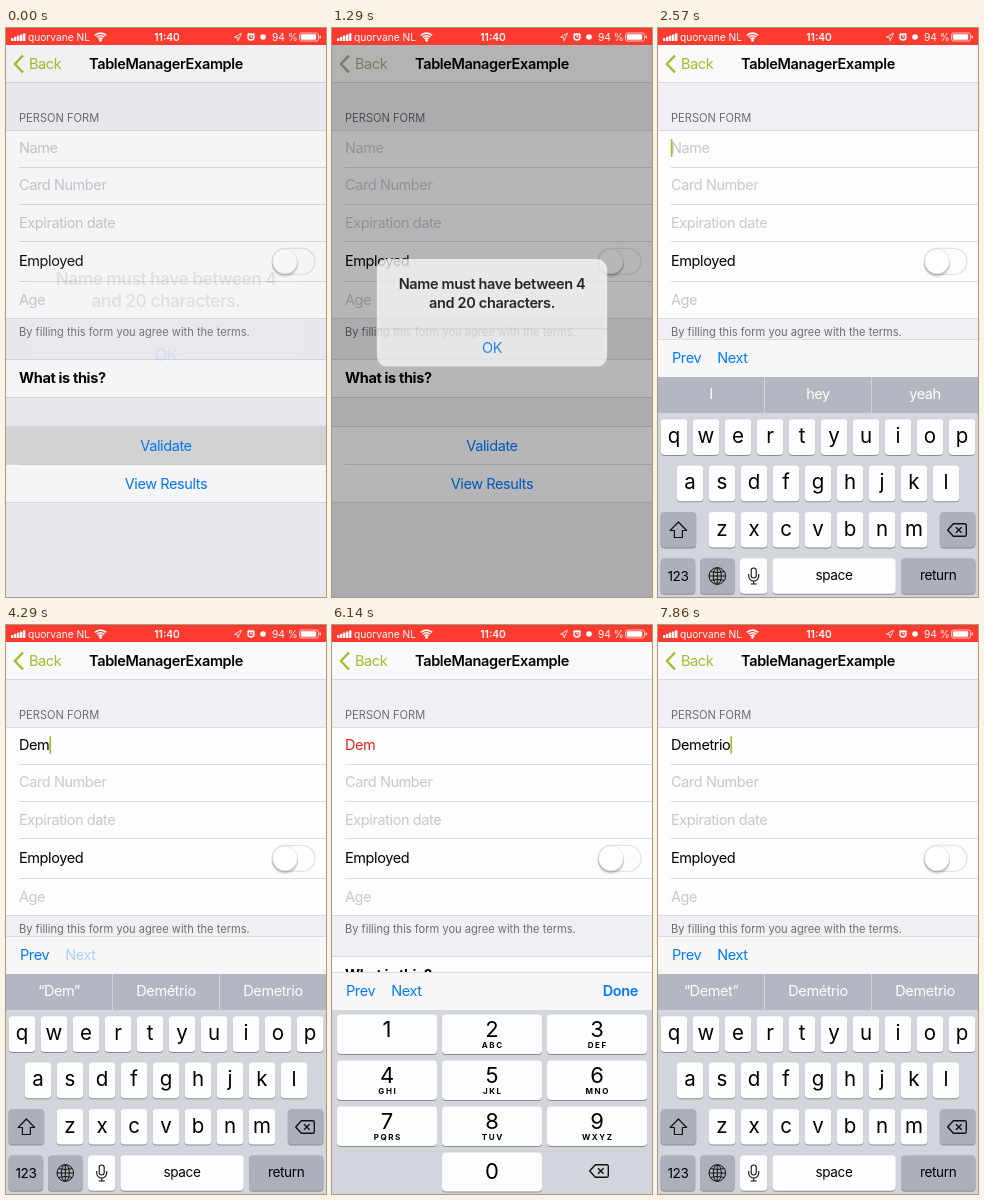
Recreate the animation shown at these times as an HTML page. Size 320x569 px, loop 8 s.

```html
<!DOCTYPE html>
<html lang="en">
<head>
<meta charset="utf-8">
<title>Form validation</title>
<style>
html, body { margin: 0; width: 100%; height: 100%; overflow: hidden; background: #efeff4; }
svg { display: block; width: 100%; height: 100%; }
text { font-family: Inter, "Liberation Sans", sans-serif; white-space: pre; }
</style>
</head>
<body>
<svg id="stage" viewBox="0 0 320 569"></svg>
<script>
const LOOP = 8000;
const BLUE = '#007aff', GREEN = [160, 190, 44], LINE = '#c8c7cc', HINT = '#c7c7cd', PAPER = '#fdfcfe';
const stage = document.getElementById('stage');

// Timing helpers
const ramp = (t, start, length) => Math.min(1, Math.max(0, (t - start) / length));
const easeOut = u => 1 - (1 - u) ** 3;
const easeBoth = u => u * u * (3 - 2 * u);
const within = (t, a, b) => t >= a && t < b;
const latest = (steps, t) => steps.filter(([at]) => at <= t).pop()[1];

// Drawing helpers; y in text() is the baseline
function text(x, y, str, { size = 14.5, fill = '#000', weight = 400, anchor = 'start', gap, extra = '' } = {}) {
  const spacing = gap ?? (size < 13 ? 0 : weight > 400 ? -0.024 : -0.028);
  return `<text x="${x}" y="${y}" font-size="${size}" fill="${fill}" font-weight="${weight}"
    text-anchor="${anchor}" letter-spacing="${spacing}em" ${extra}>${str}</text>`;
}
const middle = (x, y, str, style) => text(x, y, str, { anchor: 'middle', ...style });
const rect = (x, y, w, h, fill, r = 0, extra = '') =>
  `<rect x="${x}" y="${y}" width="${w}" height="${h}" fill="${fill}" rx="${r}" ${extra}/>`;
const rule = (y, x = 0) => rect(x, Math.round(y), 320 - x, 0.6, LINE);
const path = (d, stroke, width = 1.2, fill = 'none') =>
  `<path d="${d}" fill="${fill}" stroke="${stroke}" stroke-width="${width}" stroke-linejoin="round"/>`;
const group = (body, { x = 0, y = 0, alpha = 1 } = {}) =>
  `<g transform="translate(${x} ${y})" opacity="${alpha}">${body}</g>`;

// Status bar
function statusBar() {
  const white = { size: 10.2, fill: '#fff' };
  let out = rect(0, 0, 320, 17, '#ff3b30');
  for (let i = 0; i < 5; i++) out += rect(5 + i * 3, 10 - i * 1.2, 2.4, 3 + i * 1.2, '#fff', 0.5);
  out += text(22, 12.6, 'quorvane NL', white);
  for (const r of [2.8, 5.4, 8])
    out += path(`M${94.5 - r * 0.7} ${13 - r * 0.7}A${r} ${r} 0 0 1 ${94.5 + r * 0.7} ${13 - r * 0.7}`, '#fff', 1.6);
  out += '<circle cx="94.5" cy="12.4" r="1.3" fill="#fff"/>';
  out += middle(161, 12.6, '11:40', { ...white, weight: 600 });
  out += path('M228.5 9.2L235.5 5.2L232 12.8L231.6 9.5Z', '#fff', 0.8);
  out += '<circle cx="245" cy="9" r="3" fill="none" stroke="#fff" stroke-width="1.5"/>';
  out += path('M245 7V9.2H246.5M241.3 6.5L243 5M248.7 6.5L247 5', '#fff', 1);
  out += '<circle cx="257" cy="9" r="2.8" fill="#fff"/>';
  out += text(266, 12.6, '94 %', white);
  out += rect(293.5, 5, 19, 8, 'none', 2, 'stroke="#fff" stroke-width=".7"');
  return out + rect(294.8, 6.2, 15.4, 5.6, '#fff', 1) + rect(313.6, 7.6, 1.2, 2.8, '#fff', 0.6);
}

function navBar(gray) {
  const back = `rgb(${GREEN.map(c => Math.round(c + (165 - c) * gray))})`;
  return rect(0, 17, 320, 37.5, '#f9f9f9') + rule(54.3) +
    path('M17 27.5L8.8 36L17 44.5', back, 2.4) + text(23, 41, 'Back', { fill: back }) +
    middle(160, 41, 'TableManagerExample', { weight: 600 });
}

function form(name, nameColor, pressed) {
  const small = { size: 11.1, fill: '#6d6d72' };
  let out = rect(0, 0, 320, 569, '#efeff4') + text(13, 93.5, 'PERSON FORM', small);
  for (const [y, h] of [[102, 188.7], [331.8, 37.3], [398.8, 75.7]])
    out += rect(0, y, 320, h, PAPER) + rule(y - 0.4) + rule(y + h - 0.4);
  out += rect(0, 398.8, 320, 38, '#d9d9d9', 0, `opacity="${pressed}"`);
  for (const y of [138.6, 176, 213.3, 253.2, 436.4]) out += rule(y, 13);
  out += text(13, 125.2, name || 'Name', { fill: name ? nameColor : HINT, extra: 'id="name"' });
  for (const [label, y] of [['Card Number', 162.2], ['Expiration date', 199.5], ['Age', 277]])
    out += text(13, y, label, { fill: HINT });
  out += text(13, 238.2, 'Employed') +
    rect(266, 220.4, 43, 26, PAPER, 13, 'stroke="#e3e3e3" stroke-width="1.3"') +
    '<circle cx="279" cy="236" r="13.4" fill="#000" opacity=".08"/>' +
    '<circle cx="279" cy="235" r="12.8" fill="#000" opacity=".16"/>' +
    '<circle cx="279" cy="233.4" r="12.4" fill="#fff" stroke="#d4d4d4" stroke-width=".5"/>';
  return out + text(13, 307.8, 'By filling this form you agree with the terms.', small) +
    text(13, 355.4, 'What is this?', { weight: 700 }) +
    middle(160, 423, 'Validate', { fill: BLUE }) + middle(160, 461, 'View Results', { fill: BLUE });
}

function alertBox(alpha, scale) {
  const bold = { weight: 600 };
  return `<g opacity="${alpha}" transform="translate(160 285) scale(${scale}) translate(-160 -285)">` +
    rect(44.8, 231, 230.4, 107.6, '#f9f9f9', 11, 'fill-opacity=".97"') +
    middle(160, 261.3, 'Name must have between 4', bold) + middle(160, 280.3, 'and 20 characters.', bold) +
    rect(44.8, 300.6, 230.4, 0.5, '#c4c4c8') + middle(160, 325.2, 'OK', { fill: BLUE }) + '</g>';
}

// Keyboards
const key = (x, y, w, h, fill = PAPER) => rect(x, y + 1, w, h, '#898c91', 4) + rect(x, y, w, h, fill, 4);
const eraser = (x, y) => group(
  path('M-9.3 0L-3.7 -6.3H7.7Q9.3 -6.3 9.3 -4.7V4.7Q9.3 6.3 7.7 6.3H-3.7Z', '#111', 1.4) +
  path('M-1 -2.8L4.6 2.8M4.6 -2.8L-1 2.8', '#111', 1.4), { x, y });

function letterKeys(upper) {
  const gray = '#abb0ba', label = { size: 13.6 };
  let out = '';
  ['qwertyuiop', 'asdfghjkl', 'zxcvbnm'].forEach((row, r) => {
    const y = 391.3 + r * 46.3;
    [...row].forEach((c, i) => {
      const x = [16, 32, 64][r] + i * 32;
      out += key(x - 13.4, y, 26.8, 35.6) +
        middle(x, y + (upper ? 25 : 23.8), upper ? c.toUpperCase() : c, { size: upper ? 19 : 20.5, gap: 0 });
    });
  });
  out += key(2.6, 484, 35.6, 35.6, upper ? PAPER : gray) +
    path('M20.4 494L28.6 502.5H24.4V509.5H16.4V502.5H12.2Z', '#111', 1.2, upper ? '#111' : 'none');
  out += key(281.8, 484, 35.6, 35.6, gray) + eraser(299, 502);
  for (const [x, w, fill] of [[2.6, 34.6, gray], [42, 34.6, gray], [82, 27.4], [114.4, 123.4], [243, 74.4, gray]])
    out += key(x, 530.2, w, 35.6, fill);
  out += middle(20, 552.8, '123', label) + middle(176, 552.2, 'space', label) + middle(280.2, 552.2, 'return', label);
  out += group('<circle r="8.3" fill="none" stroke="#111"/><ellipse rx="4" ry="8.3" fill="none" stroke="#111"/>' +
    path('M-8.3 0H8.3M0 -8.3V8.3M-7 -4.4Q0 -2.6 7 -4.4M-7 4.4Q0 2.6 7 4.4', '#111', 1), { x: 59.3, y: 548 });
  out += group(rect(-2.5, -8, 5, 10, 'none', 2.5, 'stroke="#111" stroke-width="1.1"') +
    path('M-5 -2V0A5 5 0 0 0 5 0V-2M0 5V8M-3 8H3', '#111', 1.1), { x: 95.7, y: 548 });
  return out;
}

function suggestions(words) {
  let out = rect(0, 349, 320, 36, '#b2b7c1');
  words.forEach((word, i) => out += middle(53 + i * 107, 371, word, { fill: '#fff' }));
  return out + rect(106, 349, 1, 36, '#cfd3da') + rect(213, 349, 1, 36, '#cfd3da');
}

function numberPad() {
  const letters = ['', 'ABC', 'DEF', 'GHI', 'JKL', 'MNO', 'PQRS', 'TUV', 'WXYZ'];
  let out = '';
  letters.forEach((caption, i) => {
    const x = 5 + (i % 3) * 105, y = 389.5 + Math.floor(i / 3) * 46;
    out += key(x, y, 100, 39.4) + middle(x + 50, y + 22, i + 1, { size: 22, gap: 0 }) +
      middle(x + 50.8, y + 33.3, caption, { size: 8, weight: 700, gap: 0.2 });
  });
  return out + key(110, 527.4, 100, 39) + middle(160, 554.2, 0, { size: 22, gap: 0 }) + eraser(267, 546);
}

function toolbar(prevDim, nextDim, done) {
  const button = (x, label, dim) => text(x, 335.2, label, { fill: BLUE, extra: `opacity="${dim ? 0.3 : 1}"` });
  return rect(0, 311, 320, 38.5, '#f7f7f8') + rule(310.8) + button(14, 'Prev', prevDim) + button(59.3, 'Next', nextDim) +
    text(306, 335.2, 'Done', { fill: BLUE, weight: 600, anchor: 'end', extra: `opacity="${done}"` });
}

function keyboard(t) {
  const pad = easeBoth(ramp(t, 4430, 300)) - easeBoth(ramp(t, 6570, 300));
  const hidden = start => 258 * (1 - easeOut(ramp(t, start, 400)));
  const upper = within(t, 3140, 3570);
  const bar = toolbar(within(t, 6430, 6570), within(t, 4140, 4430), pad);
  return group(bar, { y: hidden(2007) + 36 * pad }) +
    group(rect(0, 349 + 36 * pad, 320, 220, '#d2d5db') +
      group(suggestions(latest(hints, t)), { y: 36 * pad, alpha: 1 - pad }) +
      (pad < 1 ? group(letterKeys(upper), { alpha: 1 - pad }) : '') +
      (pad > 0 ? group(numberPad(), { alpha: pad }) : ''), { y: hidden(1995) });
}

const typed = [[0, ''], [3570, 'D'], [3710, 'De'], [3860, 'Dem'], [7290, 'Deme'], [7570, 'Demet'], [7860, 'Demetrio']];
const guesses = word => [`“${word}”`, 'Demétrio', 'Demetrio'];
const hints = [[0, ['I', 'hey', 'yeah']], [3710, ['“D”', 'Do', 'De']], [3860, ['“De”', 'De', 'Dez']],
  [4140, guesses('Dem')], [7430, guesses('Deme')], [7710, guesses('Demet')]];
const blinks = [[2860, 3140], [5430, 5860], [6070, 6570]];

function draw() {
  const t = performance.now() % LOOP;
  const phase = 0.0228 * (t + 20);
  const shown = 1 - (1 + phase) * Math.exp(-phase);
  const alpha = shown * (1 - easeBoth(ramp(t, 1200, 300)));
  const onCard = within(t, 4430, 6570);
  const name = latest(typed, t);

  let out = form(name, onCard ? '#e0261d' : '#000', 1 - ramp(t, 100, 350)) + navBar(alpha);
  const cursorOn = t >= 2010 && !blinks.some(([a, b]) => within(t, a, b));
  if (cursorOn) out += rect(12.8, onCard ? 148 : 111, 1.7, 18, `rgb(${GREEN})`, 0.8, 'id="cursor"');
  if (t >= 1995) out += keyboard(t);
  if (alpha > 0) out += rect(0, 17, 320, 552, '#000', 0, `opacity="${0.36 * alpha}"`) + alertBox(alpha, 1.2 - 0.2 * shown);
  stage.innerHTML = out + statusBar();

  if (cursorOn && name && !onCard) {
    const end = 13 + document.getElementById('name').getComputedTextLength();
    document.getElementById('cursor').setAttribute('x', end);
  }
  requestAnimationFrame(draw);
}
draw();
</script>
</body>
</html>
```
